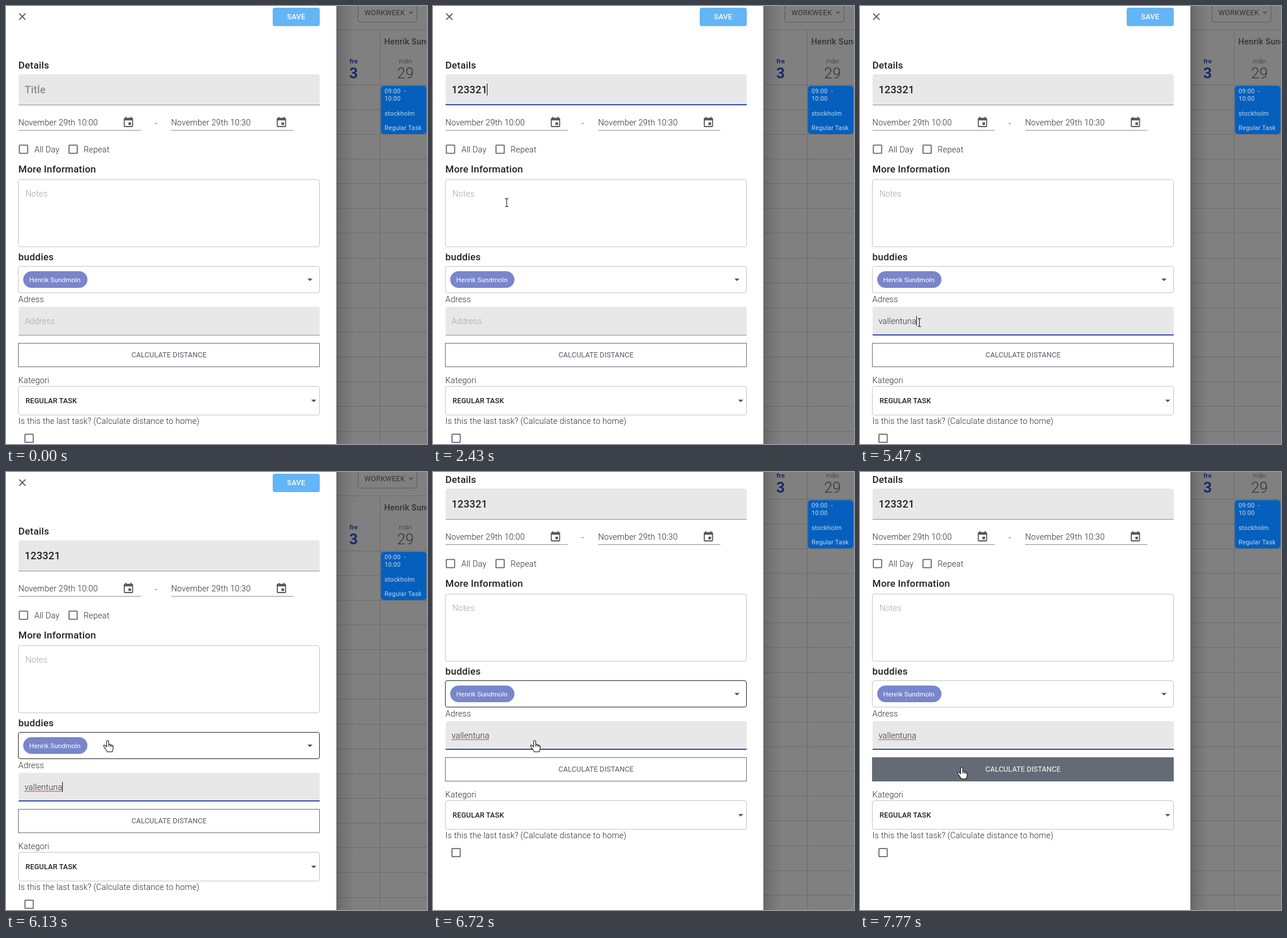
An HTML page that plays this animation: 734 by 763 pixels, repeating every 8 s.

```html
<!DOCTYPE html>
<html lang="en">
<head>
<meta charset="utf-8">
<title>New task form</title>
<style>
  html, body { margin: 0; width: 100%; height: 100%; overflow: hidden; background: #808080; }
  svg { display: block; }
  text { font: 300 14.4px Roboto, sans-serif; letter-spacing: .135px; fill: #2b2b2b; white-space: pre; }
  .head { font-size: 17px; font-weight: 500; letter-spacing: .15px; fill: #212121; }
  .title { font-size: 18px; font-weight: 500; letter-spacing: .17px; fill: #212121; }
  .hint { fill: #a3a3a3; }
  .title.hint { fill: #8f8f8f; }
  .btn { font-size: 12.6px; font-weight: 400; letter-spacing: .05px; text-anchor: middle; }
  .save { font-weight: 500; letter-spacing: .3px; fill: #fff; }
  .pick { font-size: 12.6px; font-weight: 500; letter-spacing: .1px; fill: #212121; }
  .chip { font-size: 11.7px; font-weight: 400; letter-spacing: 0; fill: #fff; }
  .event text { font-size: 10.8px; font-weight: 400; letter-spacing: .25px; fill: #c6d5e6; }
  .day { font-size: 11.7px; letter-spacing: 0; text-anchor: middle; fill: #333; }
  .date { font-size: 26px; letter-spacing: 0; text-anchor: middle; fill: #333; }
  .now { font-weight: 700; fill: #1a2c66; }
  .box { fill: #fff; stroke: #c4c4c4; }
  .check { fill: none; stroke: #666; stroke-width: 1.8; }
  .fill { fill: #e8e8e8; }
  .rule { fill: #8e8e8e; }
  .focus { fill: #3949ab; }
  .icon { fill: #575757; }
  .grid { fill: none; stroke: #6c6c6c; }
</style>
</head>
<body>
<svg width="734" height="763" viewBox="0 0 734 763">
  <defs>
    <linearGradient id="shade">
      <stop offset="0" stop-opacity=".2"/>
      <stop offset=".35" stop-opacity=".1"/>
      <stop offset="1" stop-opacity="0"/>
    </linearGradient>
    <path id="calendar" class="icon" transform="scale(.9)" d="M17 12h-5v5h5v-5zM16 1v2H8V1H6v2H5c-1.11 0-2 .9-2 2v14c0 1.1.89 2 2 2h14c1.1 0 2-.9 2-2V5c0-1.1-.9-2-2-2h-1V1h-2zm3 18H5V8h14v11z"/>
    <path id="drop" class="icon" d="M-4.5-2.2h9L0 2.3z"/>
    <rect id="tick" class="check" x="-7.2" y="-7.2" width="14.4" height="14.4" rx="1"/>
  </defs>

  <rect width="734" height="763" fill="#808080"/>
  <g id="back">
    <path id="grid" class="grid"/>
    <rect x="613.5" y="-8" width="103" height="36" rx="3.5" fill="none" stroke="#5c5c5c"/>
    <text x="625" y="15.5" style="font-size:12.6px;font-weight:400;letter-spacing:.2px;fill:#333">WORKWEEK</text>
    <use href="#drop" x="706" y="12"/>
    <text x="659.5" y="67" style="font-weight:500;letter-spacing:.25px;fill:#333">Henrik Sundmoln</text>
    <text class="day now" x="606" y="100">fre</text>
    <text class="date now" x="606" y="126">3</text>
    <text class="day" x="696.5" y="100">mån</text>
    <text class="date" x="696.5" y="126">29</text>
    <g class="event">
      <rect x="653.5" y="139" width="79.5" height="84" rx="5" fill="#0560bd"/>
      <text x="660" y="152">09:00</text>
      <text x="694" y="152">-</text>
      <text x="660" y="164.5">10:00</text>
      <text x="660" y="190.5">stockholm</text>
      <text x="660" y="215.5">Regular Task</text>
    </g>
  </g>

  <rect x="576" width="32" height="763" fill="url(#shade)"/>
  <rect width="576" height="763" fill="#fff"/>

  <g id="form">
    <path d="M23 13l11 11m0-11l-11 11" fill="none" stroke="#484848" stroke-width="1.7"/>
    <rect x="465" y="3" width="82" height="32" rx="3.5" fill="#64b5f6"/>
    <text class="btn save" x="506" y="23">SAVE</text>

    <text class="head" x="21.6" y="108.5">Details</text>
    <path class="fill" d="M22 173v-50q0-4 4-4h517q4 0 4 4v50z"/>
    <rect class="rule" x="22" y="172" width="525" height="1"/>
    <rect class="focus" id="titleLine" y="171" height="2"/>
    <text class="title" id="title" x="32.4" y="152"></text>

    <text x="21.6" y="207.5">November 29th 10:00</text>
    <text x="259" y="209">-</text>
    <text x="288" y="207.5">November 29th 10:30</text>
    <rect class="rule" x="22" y="216" width="213" height="1"/>
    <rect class="rule" x="288" y="216" width="213" height="1"/>
    <use href="#calendar" x="202.7" y="192"/>
    <use href="#calendar" x="469.4" y="192"/>

    <use href="#tick" x="30.5" y="249.5"/>
    <text x="49.5" y="254.5">All Day</text>
    <use href="#tick" x="117" y="249.5"/>
    <text x="135.3" y="254.5">Repeat</text>

    <text class="head" x="21.6" y="290">More Information</text>
    <rect class="box" x="21.5" y="302.5" width="525" height="117" rx="3.5"/>
    <text class="hint" x="34" y="331.5">Notes</text>

    <text class="head" x="21.6" y="442.5">buddies</text>
    <rect class="box" id="buddies" x="21.5" y="453.5" width="525" height="46" rx="3.5"/>
    <rect x="30" y="462" width="112" height="29" rx="14.5" fill="#7986cb"/>
    <text class="chip" x="40.6" y="481.3">Henrik Sundmoln</text>
    <use href="#drop" x="530" y="477"/>

    <text x="21.6" y="515.5">Adress</text>
    <path class="fill" d="M22 574v-46q0-4 4-4h517q4 0 4 4v46z"/>
    <rect class="rule" x="22" y="573" width="525" height="1"/>
    <rect class="focus" id="addressLine" y="572" height="2"/>
    <text id="address" x="32.4" y="554"></text>
    <path id="squiggle" fill="none" stroke="#c62828" stroke-width=".9"/>

    <rect id="button" x="21.5" y="587.5" width="525" height="41" stroke="#646b76"/>
    <text class="btn" id="buttonText" x="284.3" y="612.4">CALCULATE DISTANCE</text>

    <text x="21.6" y="656.5">Kategori</text>
    <rect class="box" x="21.5" y="662.5" width="525" height="50" rx="3.5"/>
    <text class="pick" x="34" y="692.3">REGULAR TASK</text>
    <use href="#drop" x="536.5" y="688"/>
    <text x="21.6" y="728">Is this the last task? (Calculate distance to home)</text>
    <use href="#tick" x="40.3" y="753"/>
    <rect id="caret" width="1" fill="#111"/>
  </g>

  <g id="cursor" stroke-linejoin="round">
    <path id="arrow" d="M0 0v16l3.8-3.4 2.5 5.8 2.4-1-2.5-5.7h5.2z" fill="#fff" stroke="#111"/>
    <path id="beam" d="M-3-7h2l1 1 1-1h2M0-6V6M-3 7h2l1-1 1 1h2" fill="none" stroke="#222" stroke-width="1.1"/>
    <path id="hand" d="M-2 2a1.8 1.8 0 0 1 3.6 0v5.2c1-.6 2.6-.3 2.8.8 1-.5 2.4-.1 2.6.9 1.2-.3 2.3.3 2.3 1.6v4c0 2-1.6 3-1.6 5.5h-8.7c0-2-3.2-4.3-4.8-7.4-.9-1.6-2-2.6-1.7-3.6.5-1.2 2-1 3 .2l2.5 2zM1.6 7v4M4.4 8v3M7 9v2.5" fill="#fff" stroke="#111" stroke-width="1.1"/>
  </g>
</svg>
<script>
const LOOP = 8000, SCROLL = 90, BLINK = 530;
const TITLE_FOCUS = 850, ADDRESS_FOCUS = 2760;
const HOVER_RESET = 6920, BUTTON_ENTER = 7180;
const titleKeys = [1240, 1310, 1370, 1910, 2000, 2090];
const addressKeys = [3750, 3820, 4020, 4120, 4230, 4340, 4480, 4570, 4670, 5070];
const scrollSteps = [[0, 0], [6530, 4], [6590, 22], [6650, 62], [6720, SCROLL]];
const path = [
  [190, 655, 235], [700, 162, 150], [900, 149, 145], [2150, 149, 145],
  [2600, 106, 552], [2740, 104, 555], [5404, 104, 555], [5470, 103, 551],
  [5950, 168, 476], [6130, 177, 467], [6920, 177, 467], [7200, 177, 499], [7480, 177, 514]
];
// vertical zones in form coordinates
const zones = [[119, 173, 'beam'], [302, 419, 'beam'], [453, 500, 'hand'], [525, 574, 'beam'], [587, 629, 'hand']];

const $ = id => document.getElementById(id);
const set = (id, attrs) => { for (const k in attrs) $(id).setAttribute(k, attrs[k]); };
const show = (id, on) => set(id, { visibility: on ? 'visible' : 'hidden' });
const clamp = v => Math.min(1, Math.max(0, v));
const easeOut = v => 1 - (1 - clamp(v)) ** 3;
const mix = (a, b, p) => `rgb(${a.map((v, i) => Math.round(v + (b[i] - v) * p))})`;
const lastStep = (steps, t) => steps.filter(s => s[0] <= t).pop()[1];

let lines = 'M576 41.5h158M652.5 41V900';
for (let i = 0; i < 18; i++) lines += `M576 ${Math.floor(137 + 43.15 * i) + .5}h158`;
set('grid', { d: lines });

let wave = 'M32 557';
for (let x = 34; x <= 98; x += 2) wave += `L${x} ${x % 4 ? 555.4 : 557}`;
set('squiggle', { d: wave });

function typeInto(id, text, hint, keys, t) {
  const count = keys.filter(k => k <= t).length;
  $(id).textContent = count ? text.slice(0, count) : hint;
  $(id).classList.toggle('hint', !count);
  return count ? $(id).getComputedTextLength() : 0;
}

function drawLine(id, p) {
  set(id, { x: 284.5 - 262.5 * p, width: 525 * p });
}

function drawCaret(t, titleWidth, addressWidth) {
  const inAddress = t >= ADDRESS_FOCUS;
  const resets = [TITLE_FOCUS, ...titleKeys, ADDRESS_FOCUS, ...addressKeys].filter(k => k <= t);
  show('caret', resets.length && Math.floor((t - resets.pop()) / BLINK) % 2 === 0);
  set('caret', inAddress
    ? { x: Math.round(32 + addressWidth), y: 540, height: 17 }
    : { x: Math.round(31.4 + titleWidth), y: 135, height: 21 });
}

function pointerAt(t) {
  const q = t - (t - path[0][0]) % 66;
  const i = path.findIndex(k => k[0] > q);
  if (i < 0) return path[path.length - 1].slice(1);
  if (i === 0) return path[0].slice(1);
  const [t0, x0, y0] = path[i - 1], [t1, x1, y1] = path[i];
  const p = (q - t0) / (t1 - t0);
  return [x0 + (x1 - x0) * p, y0 + (y1 - y0) * p];
}

function drawPointer(t) {
  const [x, y] = pointerAt(t);
  const formY = y + (t >= HOVER_RESET ? SCROLL : 0);
  const zone = x > 22 && x < 547 && zones.find(z => formY >= z[0] && formY <= z[1]);
  const kind = zone ? zone[2] : 'arrow';
  for (const k of ['arrow', 'beam', 'hand']) show(k, k === kind && t >= path[0][0]);
  set('cursor', { transform: `translate(${Math.round(x) + .5} ${Math.round(y) + .5})` });
  const over = t > 5470 && zone && zone[0] === 453;
  $('buddies').style.stroke = over ? '#212121' : '';
}

function draw(t) {
  const titleWidth = typeInto('title', '123321', 'Title', titleKeys, t);
  const addressWidth = typeInto('address', 'vallentuna', 'Address', addressKeys, t);
  const swap = easeOut((t - ADDRESS_FOCUS) / 200);
  drawLine('titleLine', easeOut((t - TITLE_FOCUS) / 200) - swap);
  drawLine('addressLine', swap);
  show('squiggle', t >= 5600);
  drawCaret(t, titleWidth, addressWidth);

  const p = clamp((t - BUTTON_ENTER) / 250);
  set('button', { fill: mix([255, 255, 255], [100, 107, 118], p) });
  $('buttonText').style.fill = mix([85, 90, 100], [255, 255, 255], p);

  const move = { transform: `translate(0 ${-lastStep(scrollSteps, t)})` };
  set('back', move);
  set('form', move);
  drawPointer(t);
}

const start = performance.now();
function tick() {
  draw((performance.now() - start) % LOOP);
  requestAnimationFrame(tick);
}
tick();
</script>
</body>
</html>
```
